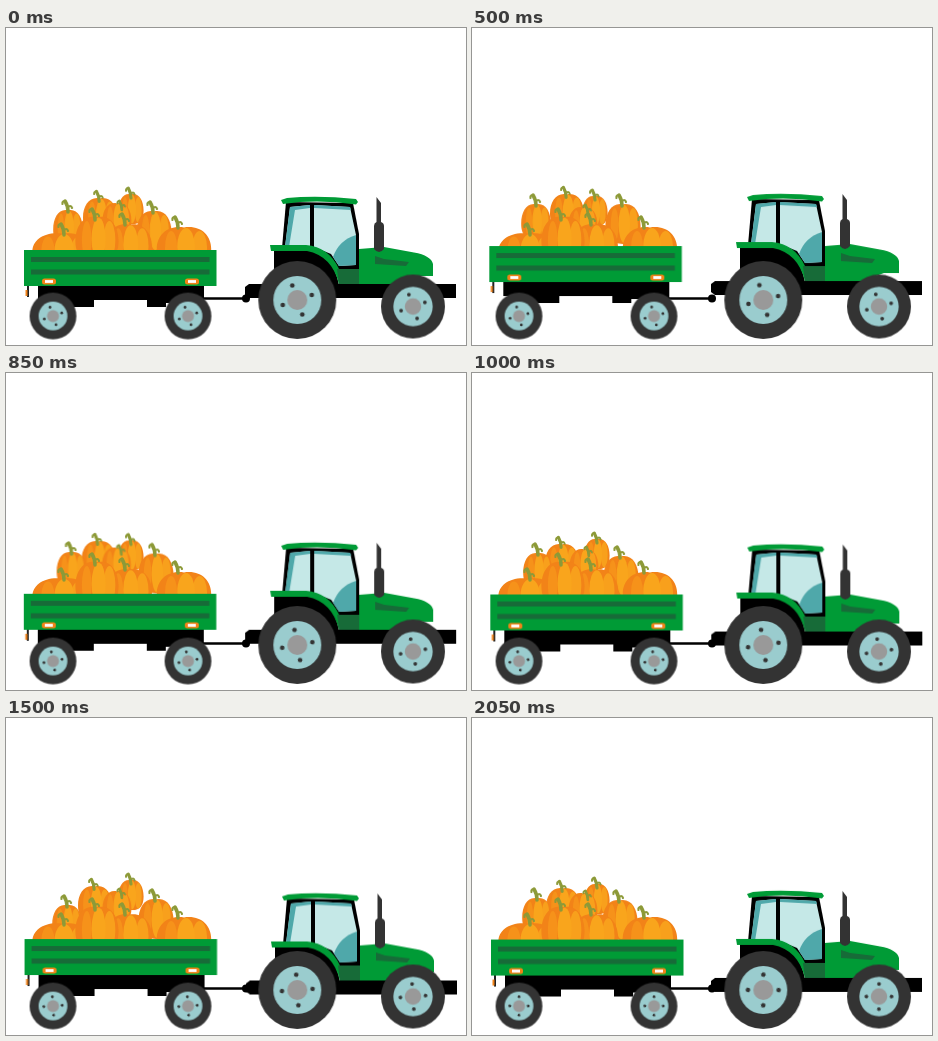
These frames come from a looping animation (460 by 317 pixels, 2.1 s). An HTML page without scripts:

```html
<!DOCTYPE html>
<html lang="en">
<head>
<meta charset="utf-8">
<title>Tractor with pumpkins</title>
<style>
html, body { margin: 0; width: 100%; height: 100%; overflow: hidden; background: #fff; }
svg { display: block; width: 460px; height: 317px; }
.spin { animation: spin 2.1s steps(42) infinite; }
.tractor { animation: tractor 2.1s linear infinite; }
.bed { animation: bed 2.1s linear infinite; }
.a { animation: a 2.1s linear infinite; }
.b { animation: b 2.1s linear infinite; }
.c { animation: c 2.1s linear infinite; }
.d { animation: d 2.1s linear infinite; }
.e { animation: e 2.1s linear infinite; }
/* four bolts: a quarter turn closes the loop */
@keyframes spin { to { transform: rotate(90deg); } }
@keyframes tractor {
  0%, 100% { transform: translate(0, 0); }
  23.81% { transform: translate(0, -3px); }
  33.33% { transform: translate(0, -1px); }
  47.62% { transform: translate(.3px, 2.5px); }
  71.43% { transform: translate(1px, 6.5px); }
  83.33% { transform: translate(.3px, 6.2px); }
  97.62% { transform: translate(0, 4px); }
}
@keyframes bed {
  0%, 100% { transform: translate(0, 0); }
  23.81% { transform: translate(-.7px, -4px); }
  33.33% { transform: translate(-.7px, -2px); }
  47.62% { transform: translate(.3px, -.5px); }
  71.43% { transform: translate(.5px, -1px); }
  83.33% { transform: translate(1px, -.5px); }
  97.62% { transform: translate(1px, -.5px); }
}
@keyframes a {
  0%, 100% { transform: translate(62px, 197px); }
  23.81% { transform: translate(64px, 191px); }
  33.33% { transform: translate(65px, 193px); }
  47.62% { transform: translate(66px, 195px); }
  71.43% { transform: translate(61px, 202px); }
  83.33% { transform: translate(66px, 198px); }
  97.62% { transform: translate(65px, 195px); }
}
@keyframes b {
  0%, 100% { transform: translate(94px, 185px); }
  23.81% { transform: translate(95px, 181px); }
  33.33% { transform: translate(95px, 180px); }
  47.62% { transform: translate(90px, 186px); }
  71.43% { transform: translate(89px, 183px); }
  83.33% { transform: translate(89px, 181px); }
  97.62% { transform: translate(91px, 185px); }
}
@keyframes c {
  0%, 100% { transform: translate(125px, 179px); }
  23.81% { transform: translate(123px, 181px); }
  33.33% { transform: translate(125px, 182px); }
  47.62% { transform: translate(125px, 179px); }
  71.43% { transform: translate(125px, 175px); }
  83.33% { transform: translate(124px, 181px); }
  97.62% { transform: translate(125px, 179px); }
}
@keyframes d {
  0%, 100% { transform: translate(148px, 198px); }
  23.81% { transform: translate(151px, 191px); }
  33.33% { transform: translate(151px, 193px); }
  47.62% { transform: translate(149px, 198px); }
  71.43% { transform: translate(150px, 196px); }
  83.33% { transform: translate(148px, 197px); }
  97.62% { transform: translate(148px, 197px); }
}
@keyframes e {
  0%, 100% { transform: translate(111px, 189px); }
  23.81% { transform: translate(111px, 193px); }
  33.33% { transform: translate(109px, 187px); }
  47.62% { transform: translate(112px, 190px); }
  71.43% { transform: translate(111px, 187px); }
  83.33% { transform: translate(113px, 186px); }
  97.62% { transform: translate(111px, 189px); }
}
</style>
</head>
<body>
<svg viewBox="0 0 460 317">
  <defs>
    <g id="gourd">
      <path d="M0-19.500C12-22 20-12 20 2S12 21 0 20S-20 16-20 2S-12-22 0-19.500Z" fill="#f28318"/>
      <ellipse cx="11.500" cy="1" rx="5.500" ry="17" fill="#f8a01c"/>
      <ellipse cx="-9.500" cy="1" rx="4.500" ry="17" fill="#f6921a"/>
      <ellipse cx="1.500" rx="6.500" ry="19" fill="#f9a51c"/>
    </g>
    <g id="stem" fill="none" stroke="#8d9a38" stroke-linecap="round">
      <path d="M1 2Q1-4-2-9" stroke-width="3.500"/>
      <path d="M-2-9Q-5-9-4.500-6M0-2Q4-6 5-2" stroke-width="2.200"/>
    </g>
    <g id="wheel">
      <circle r="39" fill="#333"/>
      <circle r="24" fill="#9accce"/>
      <circle r="10" fill="#999"/>
      <g class="spin" fill="#333">
        <circle cx="-5" cy="-14.500" r="2.300"/>
        <circle cx="14.500" cy="-5" r="2.300"/>
        <circle cx="5" cy="14.500" r="2.300"/>
        <circle cx="-14.500" cy="5" r="2.300"/>
      </g>
    </g>
    <g id="lamp">
      <rect x="-7" y="-3" width="14" height="6" rx="2.500" fill="#f28318"/>
      <rect x="-4" y="-1.400" width="8" height="2.800" fill="#fff"/>
    </g>
  </defs>

  <!-- loose pumpkins -->
  <g class="c"><use href="#gourd" transform="translate(0 2) scale(.63 .75)"/><use href="#stem" x="-1" y="-12" transform="scale(.9)"/></g>
  <g class="b"><use href="#gourd" transform="translate(0 3) scale(.85 .9)"/><use href="#stem" x="-2" y="-15" transform="scale(.9)"/></g>
  <g class="e"><use href="#gourd" transform="translate(0 2) scale(.72 .8)"/><use href="#stem" x="5" y="-11" transform="scale(.8)"/></g>
  <g class="a"><use href="#gourd" transform="translate(0 3) scale(.74 .9)"/><use href="#stem" x="-1" y="-15"/></g>
  <g class="d"><use href="#gourd" transform="translate(0 5) scale(.88 1)"/><use href="#stem" x="-2" y="-15"/></g>

  <!-- front row -->
  <use href="#gourd" transform="translate(56 222) scale(1.48 .84)"/>
  <use href="#gourd" transform="translate(178 219) scale(1.36 1)"/>
  <use href="#gourd" transform="translate(123 217) scale(1.15 1.04)"/>
  <use href="#gourd" transform="translate(91 211) scale(1.08 1.12)"/>
  <use href="#stem" x="57" y="205"/>
  <use href="#stem" x="88" y="190"/>
  <use href="#stem" x="118" y="195"/>
  <use href="#stem" x="171" y="198"/>

  <path d="M196 270.500H241" stroke="#000" stroke-width="2.300"/>
  <circle cx="240" cy="270.500" r="4"/>

  <g class="bed">
    <path d="M32 257H198V275H160V279H141V272H88V279H56V272H32Z"/>
    <path d="M22 258V269" stroke="#222" stroke-width="2"/>
    <path d="M20.500 262V268" stroke="#f28318" stroke-width="2"/>
    <rect x="18" y="222" width="192.500" height="36" fill="#009b36"/>
    <path d="M25 231.500H203.500M25 244H203.500" stroke="#176b38" stroke-width="5"/>
    <use href="#lamp" x="43" y="253.500"/>
    <use href="#lamp" x="186" y="253.500"/>
  </g>
  <use href="#wheel" transform="translate(47 288) scale(.6)"/>
  <use href="#wheel" transform="translate(182 288) scale(.6)"/>

  <g class="tractor">
    <path d="M243 256H450V270H243L239 267V259Z"/>
    <path d="M280 174L347 175L353 206V242H331L276 220Z"/>
    <path d="M284 179L304 177V219H279Z" fill="#c5e8e7"/>
    <path d="M284 179L304 177V180L289 182L283 219H279Z" fill="#4fa8aa"/>
    <path d="M308 177L344 179L350 207V237L333 238L325 226L308 219Z" fill="#c5e8e7"/>
    <path d="M308 177L344 179L345 182L308 180Z" fill="#4fa8aa"/>
    <path d="M350 207V237L333 238L327 229Q333 212 350 207Z" fill="#4fa8aa"/>
    <path d="M275 172L281 170Q312 167 350 171L352 174L350 176.500Q312 171 277 176Z" fill="#009b36"/>
    <path d="M268 221H305Q328 229 333 257H268Z" fill="#000"/>
    <path d="M264 217H300Q323 219 333 241V256Q326 228 301 223H265Z" fill="#009b36"/>
    <path d="M331 241H354V256H333Z" fill="#176b38"/>
    <path d="M353 221L378 219L408 224.500Q425 227.500 427 236V248H412L390 256H353Z" fill="#009b36"/>
    <path d="M369 228L378 231L403 234L400 238L369 236Z" fill="#176b38"/>
    <path d="M370.500 169L375 175V194Q378 195 378 198V221Q373 227 368 221V198Q368 195 370.500 194Z" fill="#333"/>
  </g>
  <use href="#wheel" transform="translate(291.300 272)"/>
  <use href="#wheel" transform="translate(407 278.500) scale(.82)"/>
</svg>
</body>
</html>
```
